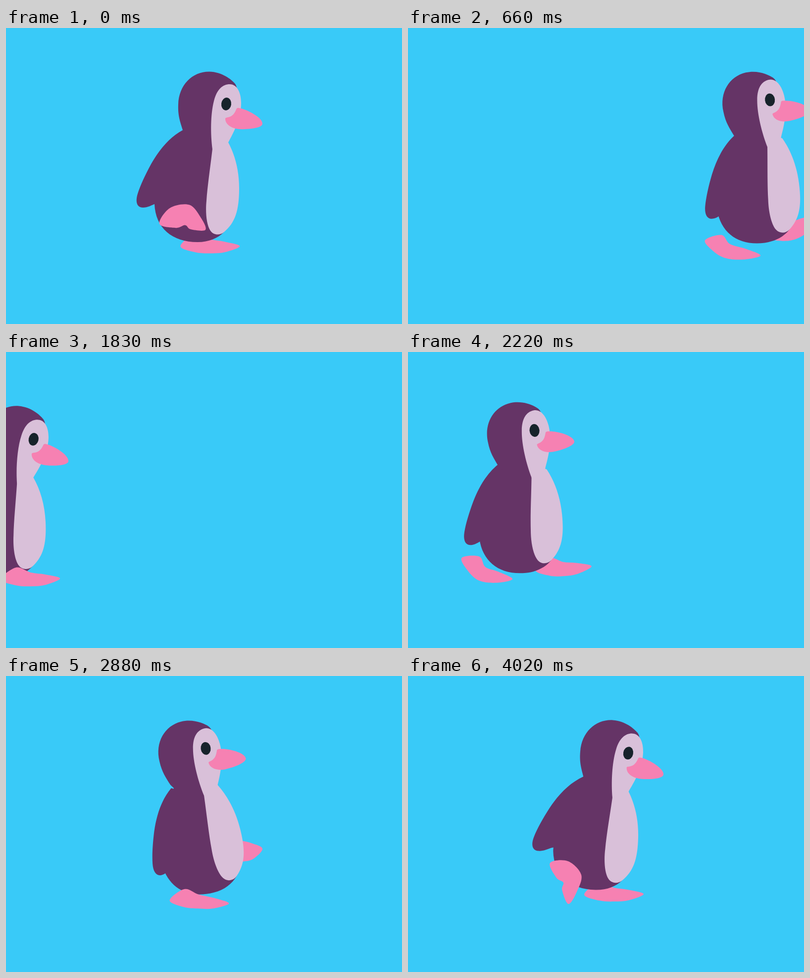
Recreate the animation shown at these times as an HTML page. Size 800 px wide and 600 px high, loop 4050 ms.

```html
<!DOCTYPE html>
<html lang="en">
<head>
<meta charset="utf-8">
<title>Walking penguin</title>
<style>
  html, body { margin: 0; width: 100%; height: 100%; overflow: hidden; background: #39caf8; }
  svg { display: block; width: 800px; height: 600px; }
  .dark { fill: #653466; }
  .light { fill: #d9c0d9; }
  .pink { fill: #f681b2; }
  .ink { fill: #17232b; }
</style>
</head>
<body>
<svg viewBox="0 0 800 600">
  <g id="bird">
    <path id="far" class="pink"/>
    <path id="wing" class="dark" d="M357,207 C330,222 310,246 293,276 C281,298 271,320 266,336 C261,352 264,364 277,364 C286,364 295,359 302,356 L360,340 L400,240Z"/>
    <g id="body">
      <path class="dark" d="M365,212 C330,260 300,310 300,357 C302,405 335,434 387,434 C410,434 428,426 440,414 L440,240Z"/>
      <path class="light" d="M417,245 L430,225 L449,232 C463,258 471,290 471,325 C471,370 463,395 440,414 C433,420 420,421 413,411 C404,398 403,370 405,350 C407,320 413,280 417,245Z"/>
    </g>
    <g id="head">
      <path class="dark" d="M357,207 C352,190 347,178 348,155 C349,115 377,88 411,88.5 C436,89 455,104 462,112 C465,116 466,119 466,122 L440,180 L417,245 L380,245Z"/>
      <path class="light" d="M417,246 C413,215 413,175 420,148 C426,124 438,114 452,114 C468,114 475,133 475,152 C475,185 458,215 449,232 L446,240Z"/>
      <path class="pink" d="M468,162 C481,162 518,180 518,194 C518,203 490,206 472,205 C455,204 443,195 443,184 C443,181 447,182 452,180 C460,177 463,170 466,163Z"/>
      <ellipse class="ink" cx="445" cy="154" rx="10" ry="13" transform="rotate(8 445 154)"/>
    </g>
    <path id="near" class="pink"/>
  </g>
</svg>
<script>
const STEP = 30, STEPS = 135, CYCLE = 28, HALF = CYCLE / 2;
const EXIT_END = 35, ENTER = 57, ARRIVE = 92;
const NECK = [417, 245];

// Every half cycle: step, neck x, neck y, head, body and wing angles
const sway = [
  [0, 417, 245, 0, 0, 0],
  [3, 400, 242, -15, -14.3, -21.4],
  [6, 421, 222, -14.5, -10, -17.7],
  [9, 411, 254, -13.5, -5.6, -8],
  [10, 429, 266, 3.5, -2.7, 1.8],
  [13, 413, 246, 2.5, 1.4, 4.1]
];

// One stride: step, then heel, ball and toe
const stride = [
  [0, 310, 397, 366, 379, 403, 409],
  [3, 415, 372, 462, 371, 502, 366],
  [6, 410, 400, 446, 368, 470, 300],
  [9.5, 401, 461, 460, 461, 519, 459],
  [13, 340, 459, 400, 459, 460, 458],
  [20, 323, 449, 378, 455, 442, 463],
  [23.5, 267, 412, 308, 448, 363, 460],
  [27, 287, 379, 332, 411, 324, 462]
];

// Periodic cubic through the keys, without overshoot.
function sample(track, time, period) {
  const n = track.length, p = time % period;
  const key = (i, j) => {
    const k = track[(i + n) % n];
    return j ? k[j] : k[0] + period * Math.floor(i / n);
  };
  let i = 0;
  while (i < n - 1 && track[i + 1][0] <= p) i++;
  const slope = (a, j) => (key(a + 1, j) - key(a, j)) / (key(a + 1, 0) - key(a, 0));
  const tangent = (a, j) => {
    const l = slope(a - 1, j), r = slope(a, j);
    return l * r > 0 ? 2 * l * r / (l + r) : 0;
  };
  const h = key(i + 1, 0) - key(i, 0), u = (p - key(i, 0)) / h;
  const ease = u * u * (3 - 2 * u);
  return track[0].slice(1).map((_, c) => {
    const j = c + 1, a = key(i, j);
    return a + (key(i + 1, j) - a) * ease
      + h * u * (1 - u) * ((1 - u) * tangent(i, j) - u * tangent(i + 1, j));
  });
}

// Smooth closed curve through points.
function outline(pts) {
  const n = pts.length;
  const at = (i, c) => pts[(i + n) % n][c];
  const pair = f => f(0).toFixed(2) + "," + f(1).toFixed(2) + " ";
  let d = "M" + pair(c => at(0, c));
  for (let i = 0; i < n; i++) {
    d += "C" + pair(c => at(i, c) + (at(i + 1, c) - at(i - 1, c)) / 6)
      + pair(c => at(i + 1, c) - (at(i + 2, c) - at(i, c)) / 6)
      + pair(c => at(i + 1, c));
  }
  return d + "Z";
}

// Flesh around the line heel-ball-toe; a lifted foot looks fuller.
function foot(p) {
  const [hx, hy, bx, by, tx, ty] = sample(stride, p, CYCLE);
  const fat = 1 + Math.min(0.5, Math.max(0, (460 - by) / 120));
  const normal = (x, y) => { const l = Math.hypot(x, y); return [y / l, -x / l]; };
  const back = normal(bx - hx, by - hy), front = normal(tx - bx, ty - by);
  const mid = normal(-back[1] - front[1], back[0] + front[0]);
  const off = (x, y, n, w) => [x + n[0] * w, y + n[1] * w];
  const rear = [(hx + bx) / 2, (hy + by) / 2, back];
  const fore = [(bx + tx) / 2, (by + ty) / 2, front];
  return outline([
    [hx, hy], off(...rear, 24), off(bx, by, mid, 14 * fat), off(...fore, 9 * fat),
    [tx, ty], off(...fore, -12 * fat), off(bx, by, mid, -14 * fat), off(...rear, -12 * fat)
  ]);
}

const parts = {};
for (const id of ["bird", "head", "body", "wing", "near", "far"]) parts[id] = document.getElementById(id);
const place = (id, transform) => parts[id].setAttribute("transform", transform);

function travel(s) {
  if (s < EXIT_END) return 14.2 * s;
  return s < ARRIVE ? -500 * ((ARRIVE - s) / (ARRIVE - ENTER)) ** 1.7 : 0;
}

function draw(ms) {
  const s = Math.floor(ms / STEP) % STEPS;
  const away = s >= EXIT_END && s < ENTER;
  parts.bird.setAttribute("visibility", away ? "hidden" : "visible");
  if (away) return;

  const p = s < EXIT_END ? s : s - STEPS + 5 * CYCLE;
  const [x, y, head, body, wing] = sample(sway, p, HALF);
  const hinge = `translate(${x} ${y})`, back = `translate(${-NECK[0]} ${-NECK[1]})`;
  place("bird", `translate(${travel(s)} 0)`);
  place("head", `${hinge} rotate(${head}) ${back}`);
  place("body", `${hinge} rotate(${body}) scale(1 ${1 - body * 0.0025}) ${back}`);
  place("wing", `${hinge} rotate(${body}) translate(0 -30) rotate(${wing - body}) translate(0 30) ${back}`);
  parts.near.setAttribute("d", foot(p));
  parts.far.setAttribute("d", foot(p + HALF));
  place("far", "translate(16 -16)");
}

const start = performance.now();
function tick() {
  draw(performance.now() - start);
  requestAnimationFrame(tick);
}
tick();
</script>
</body>
</html>
```
